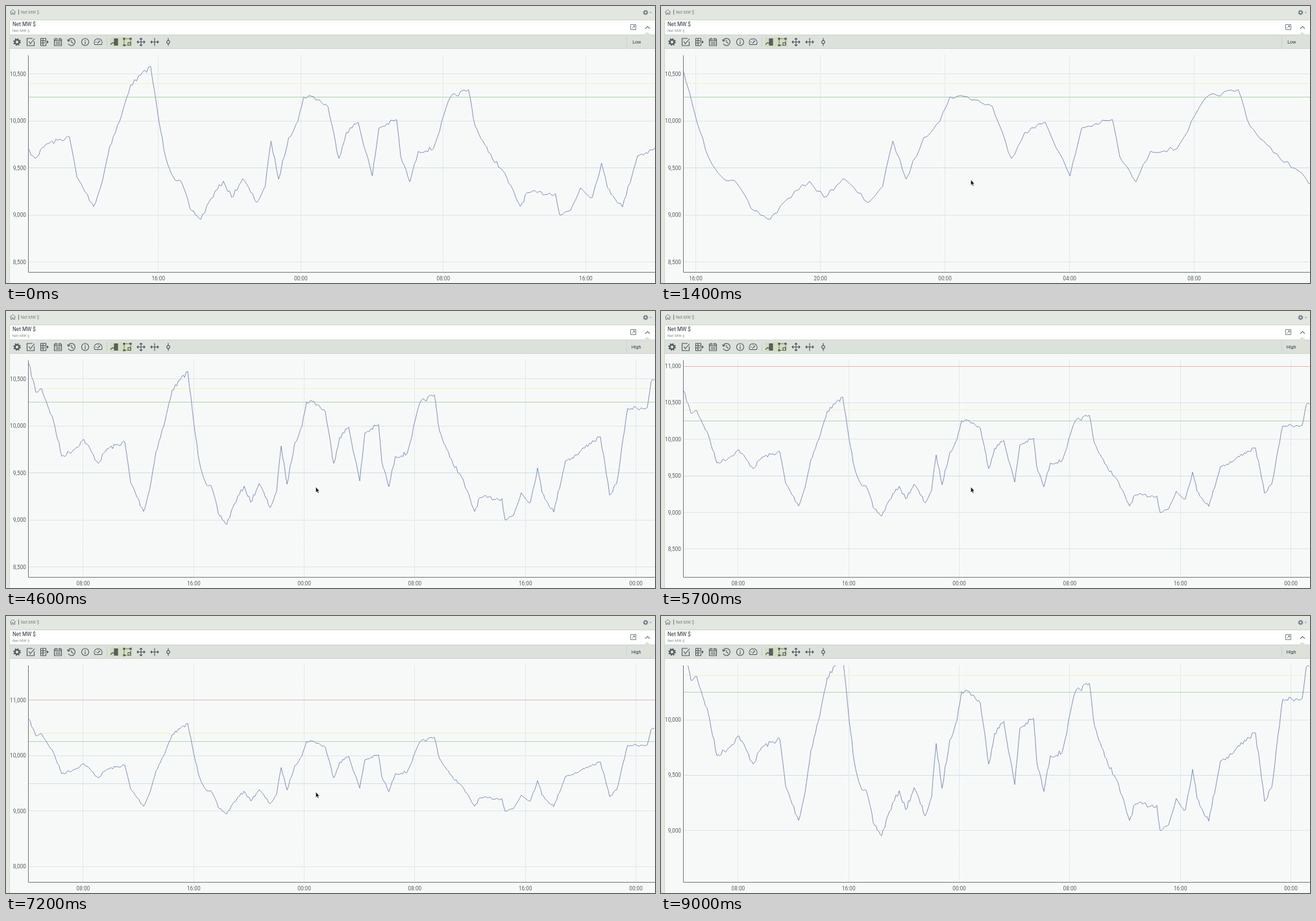
Animation of 1000x427 px, one loop 9800 ms. Source, as an HTML page:

```html
<!DOCTYPE html>
<html lang="en">
<head>
<meta charset="utf-8">
<title>Trend chart</title>
<style>
  html, body { margin: 0; height: 100%; overflow: hidden; background: #e2e7e0; }
  svg { display: block; width: 1000px; height: 427px; font-family: Roboto, sans-serif; }
  .icons { fill: none; stroke: #4a555c; stroke-width: 1.1; }
  .labels { font-size: 8.3px; fill: #555d61; }
</style>
</head>
<body>
<svg viewBox="0 0 1000 427">
  <defs>
    <clipPath id="plot"><rect x="34" y="76" width="966" height="335"/></clipPath>
    <g id="gear">
      <circle r="3.3" stroke-width="2.2"/>
      <circle r="5" stroke-width="1.7" stroke-dasharray="1.96"/>
    </g>
  </defs>

  <rect x="6" y="22" width="994" height="22" fill="#fff"/>
  <path d="M6 21.5H1000M6 44.5H1000" stroke="#cfd5cf"/>
  <rect x="6" y="45" width="994" height="21" fill="#dce1db"/>
  <path d="M6 65.5H1000" stroke="#cdd3cd"/>
  <rect x="6" y="66" width="994" height="361" fill="#f7f9f8"/>
  <path d="M5.5 22V427" stroke="#d0d7d1"/>
  <path d="M982 45l6-5 6 5z" fill="#dce1db"/>
  <rect x="160" y="48" width="35" height="15" rx="3" fill="#d5ddc0"/>

  <g class="icons">
    <path d="M6 9.5L10.5 5.5 15 9.5M7.5 9V13H9.5V10.5H11.5V13H13.5V9" stroke="#737b80" stroke-width=".9"/>
    <path d="M19.5 5.5v8" stroke="#737b80"/>
    <use href="#gear" transform="translate(985.5 10) scale(.68)" stroke="#66758a"/>
    <path d="M992 9.5h3l-1.5 1.5z" fill="#66758a" stroke="none"/>
    <path d="M962.5 28.5h8v8h-8zM964.5 34.5l4-4m-2.5 0h2.5v2.5" stroke="#68747d" stroke-width=".9"/>
    <path d="M985 35l3.5-3.5L992 35" stroke="#68747d"/>
    <path d="M155.5 48v14" stroke="#c2c9c3" stroke-width=".8"/>
    <g id="toolbar"></g>
  </g>

  <text x="23" y="12" font-size="6.4" fill="#7b8287">Net MW $</text>
  <text x="10" y="31" font-size="8.2" fill="#30383d">Net MW $</text>
  <text x="10" y="39.5" font-size="6" fill="#858c90">Net MW $</text>

  <g id="alarm"></g>
  <g id="chart"></g>
  <path d="M34.5 76V410.5H1000" fill="none" stroke="#747a7d"/>
  <path id="cursor" d="M0 0v8l1.7-1.6 1.4 2.9 1.2-.6-1.4-2.8h2.4z" fill="#111" stroke="#fff" stroke-width=".3"/>
</svg>

<script>
const LOOP = 9800, LEFT = 35, RIGHT = 999, TOP = 76, BOTTOM = 410;
const MIDNIGHT = 459.6, HOUR = 21.29;
const $ = id => document.getElementById(id);

// Turning points of the load, as x, y in the widest time view.
const turns = [
  35,81, 46,125, 55,120, 73,169, 86,224, 104,214, 120,198, 142,235, 155,213, 183,202,
  192,264, 212,309, 222,272, 231,217, 245,170, 256,122, 280,93, 290,178, 298,233,
  307,263, 318,275, 327,312, 340,329, 352,297, 367,270, 377,295, 390,266, 407,303,
  417,278, 424,208, 433,267, 445,203, 456,178, 463,140, 475,140, 492,155, 505,235,
  514,195, 528,179, 545,262, 553,188, 574,175, 579,232, 590,271, 600,224, 618,220,
  638,141, 660,129, 668,185, 684,226, 701,254, 722,309, 730,288, 764,289, 769,322,
  782,315, 794,280, 808,295, 819,242, 826,280, 844,310, 862,231, 879,222, 899,204,
  916,194, 930,284, 941,266, 958,150, 988,149, 994,109, 999,107
];

let seed = 7;
const random = () => (seed = seed * 16807 % 2147483647) / 2147483647;

// Join the turning points with small random wobbles.
const load = [];
for (let i = 0; i < turns.length - 2; i += 2) {
  const [x1, y1, x2, y2] = turns.slice(i, i + 4);
  const parts = Math.ceil((x2 - x1) / 2.5);
  for (let k = 0; k < parts; k++) {
    const wobble = k ? (random() - .5) * 7 : 0;
    load.push([x1 + (x2 - x1) * k / parts, y1 + (y2 - y1) * k / parts + wobble]);
  }
}
load.push(turns.slice(-2));

const limits = [[11000, '#efb0ae'], [10400, '#f5efc0'], [10250, '#b0d5ae'], [9500, '#cbdfec']];

// Time views: [screen x of midnight, zoom]; value views: [screen y of 10,000, px per MW].
const day = [454.3, 1.289], near = [437.6, 2.255], wide = [MIDNIGHT, 1];
const normal = [177, .145], tall = [229, .0644], tight = [160, .1705];

const sideArrows = 'M-4-2L-6 0-4 2M4-2L6 0 4 2', cross = 'M0-6V6M-6 0H6';
const icons = [
  [17, '<use href="#gear"/>'],
  [38, 'M5.5-1V5.5H-5.5V-5.5H3M-3-1L-.5 2.5 6-5'],
  [59, 'M2.5-2V-5.5H-5.5V5.5H2.5V2M-5.5-2H2.5M-5.5 1.5H1M-2-5.5V5.5M1 0H6M4-2L6 0 4 2'],
  [80, 'M-5.5-4.5H5.5V5.5H-5.5ZM-5.5-2H5.5M-3-6.5V-3M3-6.5V-3M-3.5 .5H4M-3.5 3H4'],
  [101, 'M-5-2.5A5.5 5.5 0 1 1-5 2.5M-6.5-4L-5-1-2-2.5M0-3V.5L3 2'],
  [122, '<circle r="5.5"/><path d="M0-1V3.5M0-3.5V-2"/>'],
  [142, 'M-5 4A6 6 0 1 1 5 4ZM-1 2L3-2M-4 0H-2.5M0-4V-2.5'],
  [167, '<path d="M0-5H5V5H0Z" fill="#59645f"/><path d="M-6 4L-3 1-1 2 3-3"/>'],
  [187, '<path d="M-5-5H5V5H-5Z" stroke-dasharray="2 1.3"/><path d="M-6-6h2v2h-2zM4-6h2v2h-2zM-6 4h2v2h-2zM1 1h4v4h-4z"/>'],
  [208, cross + sideArrows + 'M-2-4L0-6 2-4M-2 4L0 6 2 4'],
  [229, cross + sideArrows],
  [250, '<path d="M0-6V6"/><circle r="2.3" fill="#dce1db"/>']
];
$('toolbar').innerHTML = icons.map(([x, art]) =>
  `<g transform="translate(${x} 55.5)">${art[0] === '<' ? art : `<path d="${art}"/>`}</g>`).join('');

const mix = (a, b, p) => a.map((v, i) => v + (b[i] - v) * p);
const crisp = v => Math.floor(v) + .5;
// Progress of a move whose first of n 100 ms steps shows at start.
const steps = (t, start, n) => Math.max(0, Math.min(1, (t - start + 100) / (n * 100)));
const line = (x1, y1, x2, y2, color, extra = '') =>
  `<path d="M${x1} ${y1}L${x2} ${y2}" stroke="${color}" ${extra}/>`;
const label = (x, y, anchor, text) => `<text x="${x}" y="${y}" text-anchor="${anchor}">${text}</text>`;

function drawChart(t) {
  const [midX, zoom] = t < 2800 ? mix(day, near, steps(t, 1100, 4)) : mix(near, wide, steps(t, 2800, 2));
  const [midY, scale] = t < 7200 ? mix(normal, tall, steps(t, 5600, 5)) : mix(tall, tight, steps(t, 7200, 5));
  const toX = x => midX + (x - MIDNIGHT) * zoom;
  const toY = mw => midY + (10000 - mw) * scale;
  let grid = '', labels = '';

  const hourStep = zoom > 1.8 ? 4 : 8;
  for (let h = -24; h <= 24; h += hourStep) {
    const x = toX(MIDNIGHT + h * HOUR);
    if (x < LEFT || x > RIGHT) continue;
    grid += line(crisp(x), TOP, crisp(x), BOTTOM, '#d7e2e5', 'stroke-dasharray="2 1"');
    labels += label(x, 423, 'middle', String((h + 24) % 24).padStart(2, '0') + ':00');
  }
  for (let mw = 7000, step = scale < .1 ? 1000 : 500; mw <= 12000; mw += step) {
    const y = toY(mw);
    if (y < TOP || y > BOTTOM) continue;
    grid += line(LEFT, crisp(y), 1000, crisp(y), '#dce6e9');
    labels += label(31, y + 3, 'end', mw.toLocaleString('en-US'));
  }

  // After zooming out only the previously visible span is loaded for a while.
  const partial = t >= 2800 && t < 4500;
  const [from, to] = partial ? [281, 709] : [LEFT, RIGHT];
  const start = partial ? toX(from) : LEFT, end = partial ? toX(to) : 1000;
  for (const [mw, color] of limits) {
    const y = crisp(toY(mw));
    grid += line(start, y, end, y, color);
  }

  const path = load.filter(([x]) => x >= from && x <= to).map(([x, y]) => {
    const mw = 10000 - (y - normal[0]) / normal[1];
    return `${toX(x).toFixed(1)} ${toY(mw).toFixed(1)}`;
  }).join('L');
  $('chart').innerHTML = `<g clip-path="url(#plot)" fill="none">${grid}
    <path d="M${path}" stroke="#8091bd" stroke-linejoin="round"/></g>
    <g class="labels">${labels}</g>`;
}

function drawAlarm(t) {
  const state = t < 2800 ? 'Low' : t < 4500 ? 'Low Low' : 'High';
  const edge = state === 'Low Low' ? 945 : 956.5;
  const mark = state === 'Low Low' ? ['M983 51l5 4 5-4M983 55l5 4 5-4', '#a5bddd']
    : state === 'High' ? ['M983 58l5-4 5 4', '#e0e8b9'] : ['', 'none'];
  $('alarm').innerHTML = line(edge, 47, edge, 64, '#bfc7c0', 'stroke-dasharray="1"') +
    `<text x="978.5" y="58" font-size="7.2" text-anchor="end" fill="#343d42">${state}</text>
     <path d="${mark[0]}" fill="none" stroke="${mark[1]}" stroke-width="1.4"/>`;
}

let shown = -1;
function frame(now) {
  const t = Math.floor(now % LOOP / 100) * 100;
  if (t !== shown) {
    shown = t;
    drawChart(t);
    drawAlarm(t);
    $('cursor').setAttribute('transform', `translate(477.5 ${t < 4500 ? 268 : 271.5})`);
    $('cursor').setAttribute('visibility', t >= 200 && t < 8600 ? 'visible' : 'hidden');
  }
  requestAnimationFrame(frame);
}
frame(0);
</script>
</body>
</html>
```
